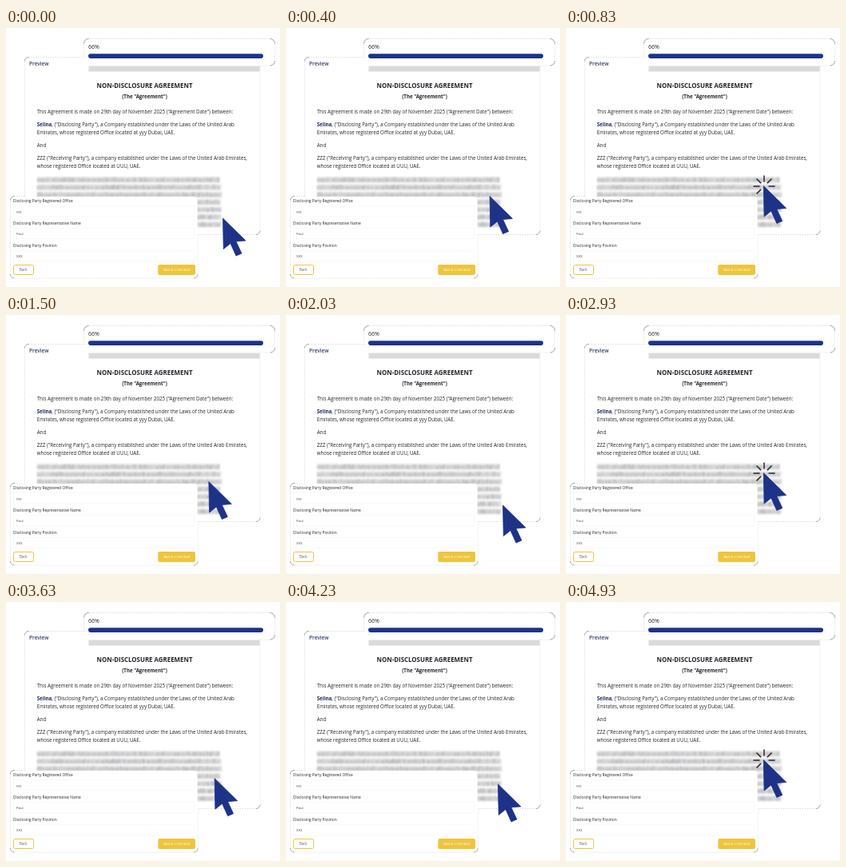
An HTML page with a canvas for the animation above (5 s loop, 343 by 324 pixels).

```html
<!DOCTYPE html>
<html lang="en">
<head>
<meta charset="utf-8">
<title>Agreement preview</title>
<style>
html, body { margin: 0; width: 100%; height: 100%; overflow: hidden; background: #fff; }
canvas { display: block; width: 343px; height: 324px; }
</style>
</head>
<body>
<canvas id="stage"></canvas>
<script>
const W = 343, H = 324, LOOP = 5000, CYCLE = 2000;
const NAVY = '#1e3288', INK = '#24262b', YELLOW = '#eec53c';
const FONT = '"Open Sans", "Noto Sans", sans-serif';
const dpr = window.devicePixelRatio || 1;

function setup(canvas) {
  canvas.width = Math.round(W * dpr);
  canvas.height = Math.round(H * dpr);
  const c = canvas.getContext('2d');
  c.scale(dpr, dpr);
  return c;
}

const ctx = setup(document.getElementById('stage'));
const backdrop = document.createElement('canvas');
const bg = setup(backdrop);

let seed = 7;
function rand() {
  seed = (seed * 16807) % 2147483647;
  return seed / 2147483647;
}

function text(str, x, y, size, { weight = 400, color = INK, align = 'left' } = {}) {
  bg.font = `${weight} ${size}px ${FONT}`;
  bg.fillStyle = color;
  bg.textAlign = align;
  bg.fillText(str, x, y);
  return bg.measureText(str).width;
}

function box(x, y, w, h, r, fill) {
  bg.beginPath();
  bg.roundRect(x, y, w, h, r);
  bg.fillStyle = fill;
  bg.fill();
}

const CARDS = {
  preview: [23.5, 36.5, 294.5, 222, 5],
  progress: [97.5, 13.5, 239, 33.5, 6],
  form: [5.5, 210.5, 234.5, 102.5, 5]
};

// Faint dotted edge with darker rounded corners
function outline([x, y, w, h, r]) {
  bg.lineWidth = 0.6;
  bg.strokeStyle = '#aaa';
  bg.setLineDash([1, 2]);
  bg.beginPath();
  bg.roundRect(x, y, w, h, r);
  bg.stroke();
  bg.setLineDash([]);
  bg.strokeStyle = '#666';
  [[x + r, y + r, 2], [x + w - r, y + r, 3], [x + w - r, y + h - r, 0], [x + r, y + h - r, 1]]
    .forEach(([cx, cy, q]) => {
      bg.beginPath();
      bg.arc(cx, cy, r, q * Math.PI / 2, (q + 1) * Math.PI / 2);
      bg.stroke();
    });
}

// White inside of a card; leaves its own edge visible but hides edges below
function face([x, y, w, h, r]) {
  box(x + 0.4, y + 0.4, w - 0.8, h - 0.8, r, '#fff');
}

function blurred(radius, paint) {
  bg.save();
  bg.filter = `blur(${radius * dpr}px)`;
  paint();
  bg.restore();
}

// A line of unreadable, blurred writing
function smudge(x, y, w, h) {
  blurred(1.2, () => {
    bg.fillStyle = 'rgba(165,166,170,0.35)';
    bg.fillRect(x, y - 1, w, h + 2);
    bg.fillStyle = 'rgba(150,151,156,0.55)';
    for (let px = x; px < x + w - 2; px += 2.2 + rand() * 1.8) {
      const drop = rand() < 0.35 ? 0 : 1.3;
      bg.fillRect(px, y + drop, 1 + rand() * 1.5, h - drop);
    }
  });
}

function drawPreview() {
  face(CARDS.preview);
  blurred(0.7, () => {
    bg.fillStyle = '#dadadb';
    bg.fillRect(103.5, 47.5, 214, 7);
  });
  text('Preview', 29, 46.5, 6.5, { weight: 600, color: '#36416a' });
  text('NON-DISCLOSURE AGREEMENT', 173.5, 75, 7.9, { weight: 700, align: 'center' });
  text('(The "Agreement")', 173.5, 88, 6.15, { weight: 700, align: 'center' });

  const x = 38.7, size = 6.2;
  text('This Agreement is made on 29th day of November 2025 ("Agreement Date") between:', x, 107.3, size);
  const name = text('Selina', x, 123.2, size, { weight: 700, color: '#1c2b5e' });
  text(', ("Disclosing Party"), a Company established under the Laws of the United Arab', x + name, 123.2, size);
  text('Emirates, whose registered Office located at yyy Dubai, UAE.', x, 133.2, size);
  text('And', x, 149.3, size);
  text('ZZZ ("Receiving Party"), a company established under the Laws of the United Arab Emirates,', x, 165.2, size);
  text('whose registered Office located at UUU, UAE.', x, 175.2, size);

  for (let i = 0; i < 7; i++) smudge(39, 187.3 + i * 9.3, 229 + rand() * 3, 5);
}

function drawProgress() {
  face(CARDS.progress);
  text('66%', 103, 25.6, 7.1);
  box(103, 32.2, 219, 5.7, 2.8, NAVY);
}

function drawForm() {
  face(CARDS.form);
  [['Disclosing Party Registered Office', 'yyy'],
   ['Disclosing Party Representative Name', 'Paul'],
   ['Disclosing Party Position', 'XXX']].forEach(([label, value], i) => {
    const y = 217.6 + i * 28;
    text(label, 9, y, 4.8);
    text(value, 13, y + 13.2, 4.3, { color: '#444' });
    bg.strokeStyle = '#f6f6f6';
    bg.lineWidth = 0.6;
    bg.strokeRect(9.5, y + 5, 226, 13);
  });
  box(9.5, 296.5, 25, 12, 2, '#fff');
  bg.strokeStyle = YELLOW;
  bg.lineWidth = 1;
  bg.stroke();
  text('Back', 21.8, 304, 4.4, { align: 'center', color: '#56608a' });
  box(190.3, 296, 46.7, 13, 2, YELLOW);
  text('SAVE & CONTINUE', 213.7, 304, 4, { align: 'center', color: '#fffaf0' });
}

bg.fillStyle = '#fff';
bg.fillRect(0, 0, W, H);
Object.values(CARDS).forEach(outline);
drawPreview();
drawProgress();
drawForm();

const ARROW = [[0, 0], [28.5, 28], [16.5, 29], [23.5, 44], [16.5, 47], [9.5, 31.5], [0.8, 38.5]];
const CLICK = { x: 247.3, y: 197.5 }, REST = { x: 271.5, y: 238 };

const clamp = v => Math.max(0, Math.min(1, v));
const ramp = (t, a, b) => clamp((t - a) / (b - a));
const ease = v => (1 - Math.cos(Math.PI * v)) / 2;

function drawArrow(x, y) {
  ctx.beginPath();
  ARROW.forEach(([dx, dy]) => ctx.lineTo(x + dx, y + dy));
  ctx.closePath();
  ctx.lineJoin = 'round';
  ctx.lineWidth = 0.8;
  ctx.strokeStyle = ctx.fillStyle = NAVY;
  ctx.fill();
  ctx.stroke();
}

function drawRays(k) {
  if (k <= 0) return;
  const near = 5.5, far = near + 8 * k;
  ctx.strokeStyle = '#25272e';
  ctx.lineWidth = 1.5;
  for (let i = 0; i < 6; i++) {
    const a = (135 + i * 45) * Math.PI / 180;
    const cos = Math.cos(a), sin = Math.sin(a);
    ctx.beginPath();
    ctx.moveTo(CLICK.x + 0.7 + cos * near, CLICK.y + 0.5 + sin * near);
    ctx.lineTo(CLICK.x + 0.7 + cos * far, CLICK.y + 0.5 + sin * far);
    ctx.stroke();
  }
}

function draw(ms) {
  // Alternating 30 and 70 ms holds
  const t = ms % LOOP;
  const step = Math.floor(t / 100) * 100 + (t % 100 >= 30 ? 30 : 0);
  const p = (step + 770) % CYCLE;
  const away = p < 800 ? ease(ramp(p, 40, 700)) : 1 - ease(ramp(p, 800, 1400));
  const rays = p < 800 ? 1 - ramp(p, 0, 120) : ramp(p, 1400, 1550);

  ctx.drawImage(backdrop, 0, 0, W, H);
  drawRays(rays);
  drawArrow(CLICK.x + (REST.x - CLICK.x) * away, CLICK.y + (REST.y - CLICK.y) * away);
}

const start = performance.now();
function frame() {
  draw(performance.now() - start);
  requestAnimationFrame(frame);
}
frame();
</script>
</body>
</html>
```
